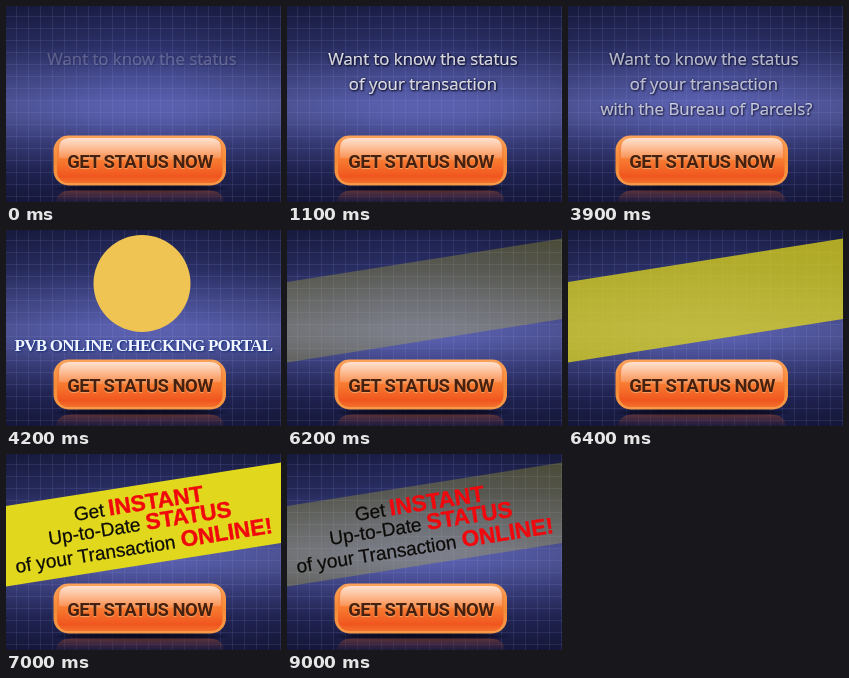
An HTML page for the animation above (9100 ms loop, 275 by 196 pixels).

```html
<!DOCTYPE html>
<html lang="en">
<head>
<meta charset="utf-8">
<title>Get status now</title>
<style>
  html, body { margin: 0; width: 100%; height: 100%; overflow: hidden; background: #1a1e46; }
  svg { display: block; width: 100vw; height: 100vh; }
  #ask text { font: 16.8px "Open Sans", "Noto Sans", sans-serif; fill: #fff; text-anchor: middle;
    stroke: #fff; stroke-width: .2px;
    text-shadow: 1px 1px 2px rgba(8, 10, 40, .9), 0 0 3px rgba(8, 10, 40, .6); }
  #brand text { font: bold 17px "Liberation Serif", Times, serif; letter-spacing: -.75px;
    fill: #f4f7ff; text-anchor: middle;
    text-shadow: 0 0 2px #1f3f9c, 1px 1px 2px #14296e; }
  #offer text { font: 19px "Liberation Sans", Arial, sans-serif; fill: #0c0b08;
    stroke: #0c0b08; stroke-width: .25px; }
  #offer .hot { font-size: 22.5px; font-weight: bold; fill: #f0080c; stroke: #f0080c; stroke-width: .4px; }
  #label { font: bold 18.5px Roboto, "Liberation Sans", sans-serif; letter-spacing: -.55px; fill: #47210f;
    text-anchor: middle; text-shadow: 0 1px 1px rgba(255, 205, 150, .6); }
</style>
</head>
<body>
<svg viewBox="0 0 275 196" preserveAspectRatio="none">
  <defs>
    <linearGradient id="sky" x2="0" y2="1">
      <stop offset="0" stop-color="#1a1e46"/>
      <stop offset=".2" stop-color="#2b3068"/>
      <stop offset=".36" stop-color="#474d92"/>
      <stop offset=".5" stop-color="#5b61b0"/>
      <stop offset=".57" stop-color="#575da9"/>
      <stop offset=".7" stop-color="#3c4182"/>
      <stop offset=".84" stop-color="#23275a"/>
      <stop offset="1" stop-color="#171a40"/>
    </linearGradient>
    <linearGradient id="sides">
      <stop offset="0" stop-opacity=".15"/>
      <stop offset=".4" stop-opacity="0"/>
      <stop offset=".6" stop-opacity="0"/>
      <stop offset="1" stop-opacity=".15"/>
    </linearGradient>
    <pattern id="grid" width="12" height="12" patternUnits="userSpaceOnUse">
      <path d="M0 10.5H12M10.5 0V12" stroke="#8f96dc" stroke-opacity=".13"/>
    </pattern>
    <linearGradient id="rim" x2="0" y2="1">
      <stop offset="0" stop-color="#fba25a"/>
      <stop offset=".5" stop-color="#f58a36"/>
      <stop offset="1" stop-color="#f79a48"/>
    </linearGradient>
    <linearGradient id="face" x2="0" y2="1">
      <stop offset="0" stop-color="#fc9450"/>
      <stop offset=".5" stop-color="#f87a30"/>
      <stop offset=".85" stop-color="#f0561e"/>
      <stop offset="1" stop-color="#f3702c"/>
    </linearGradient>
    <linearGradient id="gloss" x2="0" y2="1">
      <stop offset="0" stop-color="#fff" stop-opacity=".72"/>
      <stop offset="1" stop-color="#fff" stop-opacity=".1"/>
    </linearGradient>
    <linearGradient id="mirror" x2="0" y2="1">
      <stop offset="0" stop-color="#8f4434" stop-opacity=".6"/>
      <stop offset="1" stop-color="#5a2c3a" stop-opacity=".15"/>
    </linearGradient>
    <radialGradient id="shade">
      <stop offset="0" stop-color="#08081a" stop-opacity=".9"/>
      <stop offset=".75" stop-color="#08081a" stop-opacity=".65"/>
      <stop offset="1" stop-color="#08081a" stop-opacity="0"/>
    </radialGradient>
  </defs>

  <rect width="275" height="196" fill="url(#sky)"/>
  <rect width="275" height="196" fill="url(#sides)"/>
  <rect width="275" height="196" fill="url(#grid)"/>

  <g id="ask">
    <text x="136" y="59">Want to know the status</text>
    <text x="136" y="84">of your transaction</text>
    <text x="138.5" y="109">with the Bureau of Parcels?</text>
  </g>

  <g id="brand">
    <circle cx="136" cy="53.5" r="48.5" fill="#f0c452"/>
    <text x="137.5" y="120.5">PVB ONLINE CHECKING PORTAL</text>
  </g>

  <path id="band" d="M0 52 275 8.5V89L0 132.5Z" fill="#e1d71c"/>
  <g id="offer">
    <g transform="translate(69 67) rotate(-8.9)">
      <text>Get</text><text class="hot" x="35">INSTANT</text>
    </g>
    <g transform="translate(43.5 91) rotate(-8.9)">
      <text>Up-to-Date</text><text class="hot" x="98.5">STATUS</text>
    </g>
    <g transform="translate(10.5 119) rotate(-8.9)">
      <text>of your Transaction</text><text class="hot" x="167.5">ONLINE!</text>
    </g>
  </g>

  <ellipse cx="134" cy="182.5" rx="90" ry="5" fill="url(#shade)"/>
  <path d="M50 196Q51 184.5 66 184.5H202Q217 184.5 218 196Z" fill="url(#mirror)"/>
  <rect x="47.5" y="129.5" width="172.5" height="50" rx="15" fill="url(#rim)"/>
  <rect x="51" y="132" width="165.5" height="45" rx="11.5" fill="url(#face)"/>
  <path d="M53 152V143Q53 132 64 132H204Q215 132 215 143V152Q134 157 53 152Z" fill="url(#gloss)"/>
  <text id="label" x="134" y="161.8">GET STATUS NOW</text>
</svg>
<script>
  const LOOP = 9100, STEP = 100;

  // A run of opacities, one per step, beginning at a given time.
  const run = (start, ...levels) => levels.map((v, i) => [start + i * STEP, v]);
  const rise = start => run(start, .25, .5, .75, 1);
  const fall = run(3900, .8, .5, .25, 0);

  function play(el, keys) {
    const steps = keys[0][0] ? [[0, 0], ...keys] : keys;
    const frames = steps.map(([t, opacity]) => ({ offset: t / LOOP, opacity, easing: "steps(1, end)" }));
    frames.push({ offset: 1, opacity: steps[steps.length - 1][1] });
    el.animate(frames, { duration: LOOP, iterations: Infinity });
  }

  const $ = id => document.getElementById(id);
  const lines = $("ask").children;
  play(lines[0], [...rise(0), ...fall]);
  play(lines[1], [...rise(800), ...fall]);
  play(lines[2], [...rise(1600), ...fall]);
  play($("brand"), [[4200, 1], [6200, 0]]);
  play($("band"), [...rise(6200), [9000, .25]]);
  play($("offer"), run(6600, .2, .4, .6, .8, 1));
</script>
</body>
</html>
```
